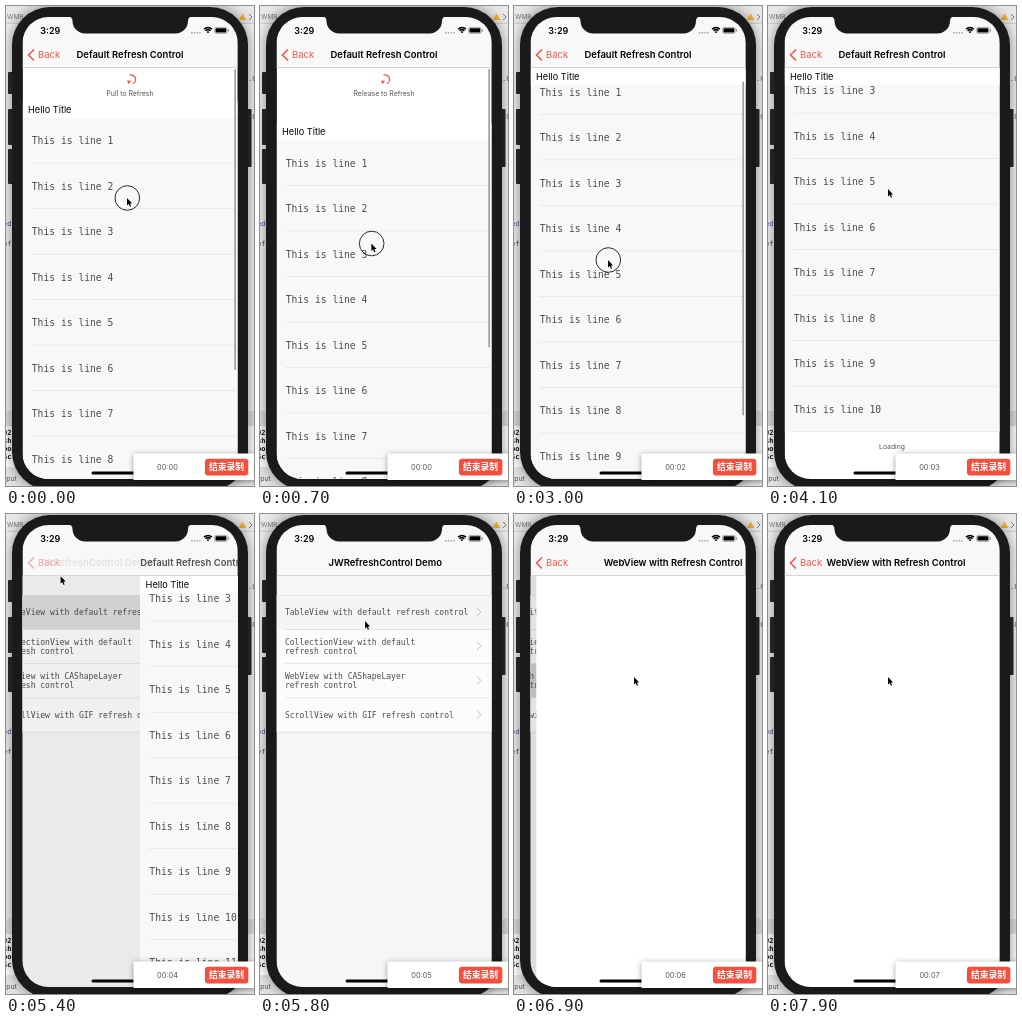
Recreate the animation shown at these times as an HTML page with a canvas. Size 248 by 480 pixels, loop 8000 ms.

```html
<!DOCTYPE html>
<html>
<head>
<meta charset="utf-8">
<style>
html, body { margin: 0; width: 100%; height: 100%; overflow: hidden; }
canvas { display: block; width: 248px; height: 480px; }
</style>
</head>
<body>
<canvas></canvas>
<script>
const LOOP = 8000, STEP = 100;
const LEFT = 16.5, RIGHT = 231.8, WIDTH = RIGHT - LEFT, NAV = 62, BOTTOM = 473;
const ROW = 45.5, HEADER = 17, MENU_ROW = 34.2;
const POP = 5300, PUSH = 6600, LOADED = 4800;
const RED = '#f4564a', BEZEL = '#1a1a1a';
const SANS = 'Inter, sans-serif', MONO = '"DejaVu Sans Mono", monospace';

const canvas = document.querySelector('canvas');
const g = canvas.getContext('2d');
const scale = window.devicePixelRatio || 1;
canvas.width = 248 * scale;
canvas.height = 480 * scale;

// [time, value...] keys, interpolated linearly
const scrollKeys = [[0, 33], [500, 50], [800, 58], [900, 58], [1100, 40], [2500, 40], [2750, 0],
  [2800, 0], [3000, -15.7], [3400, -88], [3550, -103], [3700, -108]];
const cursorKeys = [[0, 121, 192], [800, 110, 244], [1000, 109, 246], [2300, 109, 246], [2700, 95, 269],
  [3000, 94, 254], [3400, 116, 186], [3600, 120, 183], [4300, 120, 183], [4900, 42, 51],
  [5300, 42, 51], [5800, 105, 107], [6300, 120, 163]];
const presses = [[0, 900], [2700, 3400], [5100, 5300], [6400, 6600]];

function at(keys, t) {
  const i = keys.findIndex(k => k[0] > t);
  if (i < 0) return keys[keys.length - 1].slice(1);
  const a = keys[i - 1], b = keys[i], p = (t - a[0]) / (b[0] - a[0]);
  return a.slice(1).map((v, n) => v + (b[n + 1] - v) * p);
}

// Critically damped decay from 1 to 0
function decay(ms, rate) {
  const x = Math.max(0, ms) / 1000 * rate;
  return (1 + x) * Math.exp(-x);
}

function rect(x, y, w, h, color) {
  g.fillStyle = color;
  g.fillRect(x, y, w, h);
}

function round(x, y, w, h, r, color) {
  g.fillStyle = color;
  g.beginPath();
  g.roundRect(x, y, w, h, r);
  g.fill();
}

function polygon(points, color) {
  g.fillStyle = color;
  g.beginPath();
  points.forEach(p => g.lineTo(...p));
  g.fill();
}

function line(points, color, width) {
  g.strokeStyle = color;
  g.lineWidth = width;
  g.beginPath();
  points.forEach(p => g.lineTo(...p));
  g.stroke();
}

function arc(x, y, r, from, to, color, width) {
  g.strokeStyle = color;
  g.lineWidth = width;
  g.beginPath();
  g.arc(x, y, r, from, to);
  g.stroke();
}

// y is the middle of the capitals
function text(str, x, y, size, color = '#000', font = SANS, weight = 400, align = 'left') {
  g.font = `${weight} ${size}px ${font}`;
  g.fillStyle = color;
  g.textAlign = align;
  g.fillText(str, x, y + size * 0.36);
}

function clipped(x, y, w, h, draw) {
  g.save();
  g.beginPath();
  g.rect(x, y, w, h);
  g.clip();
  draw();
  g.restore();
}

function desktop() {
  rect(0, 0, 248, 480, '#f0f0f0');
  rect(0, 0, 248, 17, '#e8e8e8');
  rect(0, 17, 248, 1, '#d2d2d2');
  text('WMR', 1, 11, 6.5, '#777');
  polygon([[236.5, 7.5], [240.5, 14], [232.5, 14]], '#f3b52f');
  line([[243, 8], [246, 11], [243, 14]], '#777', 1);
  text('.0', 242, 72, 7, '#7a4a44', MONO);
  text('.0', 242, 110, 7, '#7a4a44', MONO);
  text('ed', -3, 217, 7, '#4a3aa0', MONO);
  text('ef', -3, 237, 7, '#444', MONO);
  rect(0, 405, 248, 15, '#dedede');
  rect(0, 420, 248, 41, '#fff');
  ['92', 'sh', 'bo', 'Sc'].forEach((s, i) => text(s, -3, 426 + i * 8, 7, '#111', MONO, 700));
  rect(0, 461, 248, 19, '#e4e4e4');
  text('nput', -4, 472, 7, '#555');
}

function phone() {
  [[66, 22], [103, 36], [143, 35]].forEach(([y, h]) => round(2, y, 6, h, 1, '#2a2a2a'));
  round(240, 103, 5.5, 58, 1, '#2a2a2a');
  g.save();
  g.shadowColor = 'rgba(0,0,0,.45)';
  g.shadowBlur = 14 * scale;
  round(6, 1, 236, 483, 38, BEZEL);
  g.restore();
}

function refreshHeader(t, offset) {
  const x = 124, done = t >= 2000, busy = t >= 900;
  if (done) {
    arc(x, 75, 6, 0, 7, RED, 1.1);
    line([[121, 75], [123.3, 77.3], [127.2, 72.8]], RED, 1.1);
  } else if (busy) {
    const a = t / 1000 * 7;
    arc(x, 75, 5.5, a, a + 4.9, RED, 1.2);
  } else {
    arc(125, 73.5, 4.6, -1.9, 1.2, RED, 1.2);
    polygon([[121, 74.5], [125.2, 74.8], [122.6, 78.3]], RED);
  }
  const label = done ? 'Success' : busy ? 'Loading' : offset > 40 ? 'Release to Refresh' : 'Pull to Refresh';
  text(label, x, 87.7, 6.9, '#555', SANS, 400, 'center');
}

function tablePage(t) {
  const [offset] = at(scrollKeys, t), pull = Math.max(0, offset);
  const top = NAV + HEADER + offset, count = t < LOADED ? 10 : 20;
  rect(LEFT, NAV, WIDTH, BOTTOM - NAV, '#fff');
  if (pull) clipped(LEFT, NAV, WIDTH, pull, () => refreshHeader(t, offset));
  rect(LEFT, top, WIDTH, ROW * count, '#f8f8f8');
  for (let i = 0; i < count; i++) {
    const y = top + ROW * i;
    text('This is line ' + (i + 1), 25.8, y + 23, 9.68, '#4c4c4c', MONO);
    rect(25.5, y + ROW - 0.7, RIGHT - 25.5, 0.7, '#e3e3e3');
  }
  text('Loading', 124, top + ROW * count + 14.5, 6.8, '#555', SANS, 400, 'center');
  rect(LEFT, NAV + pull, WIDTH, HEADER, '#fff');
  text('Hello Title', 22, NAV + pull + 8.3, 9.2);
  if (t < 1300 || (t >= 2700 && t < 3900)) {
    round(228.3, NAV + 1 + Math.max(0, -offset) * 0.8, 1.7, 334 - pull, 0.8, '#a0a0a0');
  }
}

function menuPage(t) {
  const items = [['TableView with default refresh control'], ['CollectionView with default', 'refresh control'],
    ['WebView with CAShapeLayer', 'refresh control'], ['ScrollView with GIF refresh control']];
  rect(LEFT, NAV, WIDTH, BOTTOM - NAV, '#f6f6f6');
  rect(LEFT, 81, WIDTH, MENU_ROW * 4, '#fcfcfc');
  items.forEach((lines, i) => {
    const y = 81 + MENU_ROW * i;
    if (i === 0 && t < PUSH) rect(LEFT, y, WIDTH, MENU_ROW, `rgba(205,205,205,${Math.exp((POP - t) / 270)})`);
    if (i === 2 && t >= 6500) rect(LEFT, y, WIDTH, MENU_ROW, '#d2d2d2');
    lines.forEach((s, n) => text(s, 25, y + 17.4 + (n - (lines.length - 1) / 2) * 9.2, 8.03, '#4c4c4c', MONO));
    line([[217, y + 13], [221, y + 17], [217, y + 21]], '#bdbdbd', 1);
    rect(i ? 25 : LEFT, y, WIDTH, 0.7, '#dcdcdc');
  });
  rect(LEFT, 81 + MENU_ROW * 4, WIDTH, 0.7, '#dcdcdc');
}

function navTitle(str, x, alpha) {
  g.globalAlpha = Math.min(1, Math.max(0, alpha));
  text(str, x, 49, 9.48, '#000', SANS, 600, 'center');
  g.globalAlpha = 1;
}

function navBar(isWeb, away, titleAway) {
  rect(LEFT, 11, WIDTH, NAV - 11, '#f8f8f8');
  rect(LEFT, NAV - 0.7, WIDTH, 0.7, '#c8c8c8');
  navTitle('JWRefreshControl Demo', 125.3 - 80 * (1 - titleAway), titleAway * 2 - 1);
  navTitle(isWeb ? 'WebView with Refresh Control' : 'Default Refresh Control',
    (isWeb ? 128 : 124) + 117 * titleAway, (1 - titleAway) * 1.5);
  g.globalAlpha = 1 - away;
  line([[28, 43.5], [22.5, 49], [28, 54.5]], RED, 1.6);
  text('Back', 32, 49, 9.5, RED);
  g.globalAlpha = 1;
}

function notch() {
  g.fillStyle = BEZEL;
  g.beginPath();
  g.moveTo(62, 10);
  g.quadraticCurveTo(66.5, 11, 66.5, 15);
  g.arcTo(66.5, 27.5, 80, 27.5, 12.5);
  g.arcTo(182, 27.5, 182, 15, 12.5);
  g.quadraticCurveTo(182, 11, 186.5, 10);
  g.fill();
}

function statusBar() {
  notch();
  text('3:29', 34.3, 24.5, 9, '#000', SANS, 600);
  for (let i = 0; i < 4; i++) rect(185 + i * 2.7, 26, 1.5, 1.5, '#aaa');
  [1.5, 3.7, 5.9].forEach(r => arc(202, 27.5, r, -2.3, -0.84, '#000', 1.5));
  g.strokeStyle = '#777';
  g.lineWidth = 0.6;
  g.beginPath();
  g.roundRect(208.6, 21.4, 12.6, 6, 1.6);
  g.stroke();
  round(209.5, 22.3, 10.8, 4.2, 0.8, '#000');
  rect(222, 23.5, 0.9, 2, '#777');
}

function screen(t) {
  const isWeb = t >= PUSH;
  const away = isWeb ? decay(t - PUSH, 18.3) : 1 - decay(t - POP, 18.3);
  const titleAway = isWeb ? decay(t - PUSH, 8.7) : away;
  g.save();
  g.beginPath();
  g.roundRect(LEFT, 11, WIDTH, BOTTOM - 11, 26);
  g.clip();
  if (away > 0.001) {
    g.save();
    g.translate(-WIDTH * 0.3 * (1 - away), 0);
    menuPage(t);
    g.restore();
    rect(LEFT, NAV, WIDTH, BOTTOM - NAV, `rgba(0,0,0,${0.1 * (1 - away)})`);
  }
  if (away < 0.999) {
    g.save();
    g.translate(WIDTH * away, 0);
    if (isWeb) rect(LEFT, NAV, WIDTH, BOTTOM - NAV, '#fff');
    else clipped(LEFT, NAV, WIDTH, BOTTOM - NAV, () => tablePage(t));
    g.restore();
  }
  navBar(isWeb, away, titleAway);
  round(85.5, 465.6, 77, 3, 1.5, '#000');
  g.restore();
  statusBar();
}

function recorder(t) {
  g.save();
  g.shadowColor = 'rgba(0,0,0,.45)';
  g.shadowBlur = 6 * scale;
  g.shadowOffsetY = scale;
  rect(127.5, 447.5, 124, 26.5, '#fff');
  g.restore();
  const seconds = Math.max(0, Math.floor((t - 500) / 1000));
  text('00:0' + seconds, 161.5, 461.3, 7.4, '#555', SANS, 400, 'center');
  round(199, 452.8, 43.3, 16.8, 3, '#f24f3f');
  text('结束录制', 220.5, 461, 8.8, '#fff', '"Noto Sans CJK SC", "Noto Sans CJK", sans-serif', 700, 'center');
}

function cursor(t) {
  const [x, y] = at(cursorKeys, t);
  if (presses.some(([from, to]) => t >= from && t < to)) arc(x + 0.3, y, 12.3, 0, 7, '#2a2a2a', 1);
  g.save();
  g.translate(x, y);
  g.beginPath();
  [[0, 0], [0, 7.5], [1.7, 6], [2.9, 8.8], [4.1, 8.3], [2.9, 5.6], [5.2, 5.4]].forEach(p => g.lineTo(...p));
  g.closePath();
  g.strokeStyle = '#fff';
  g.lineWidth = 1.2;
  g.stroke();
  g.fillStyle = '#000';
  g.fill();
  g.restore();
}

const start = performance.now();

function frame() {
  const t = Math.floor((performance.now() - start) % LOOP / STEP) * STEP;
  g.setTransform(scale, 0, 0, scale, 0, 0);
  desktop();
  phone();
  screen(t);
  recorder(t);
  cursor(t);
  requestAnimationFrame(frame);
}

frame();
</script>
</body>
</html>
```
